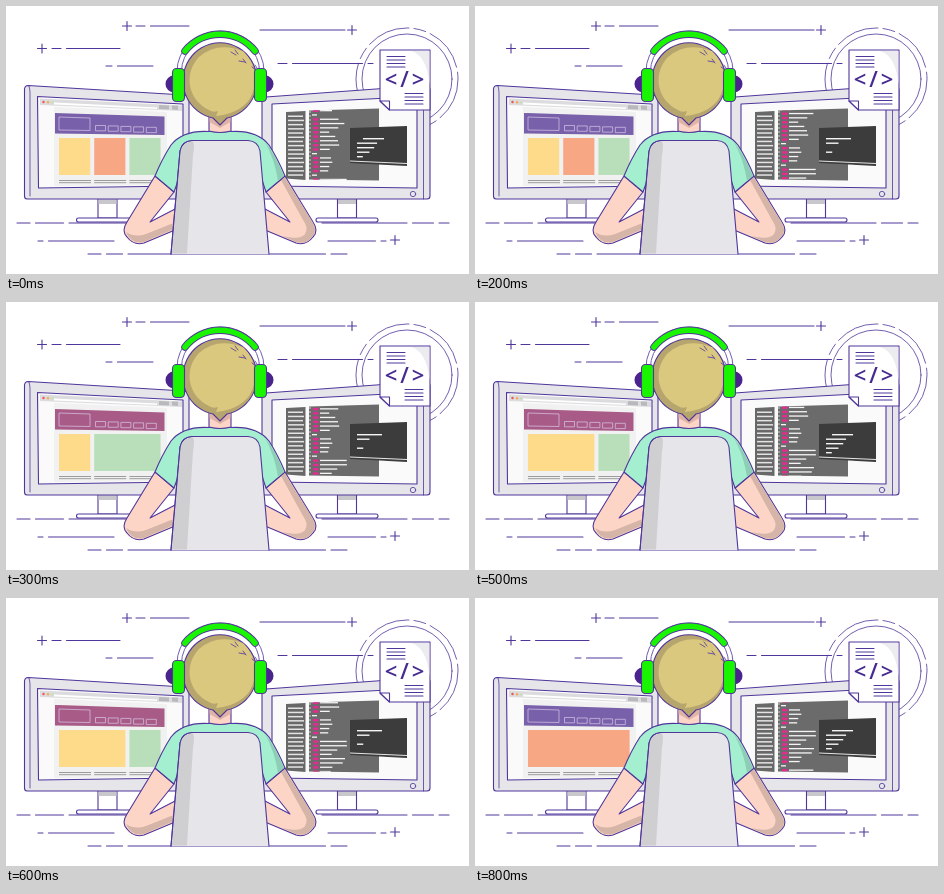
Animation, 463 px wide and 268 px high, one loop 0.9 s. Source, as an HTML page:

```html
<!DOCTYPE html>
<html lang="en">
<head>
<meta charset="utf-8">
<title>Developer at work</title>
<style>
  html, body { margin: 0; width: 100%; height: 100%; overflow: hidden; background: #fff; }
  svg { display: block; width: 100vw; height: 100vh; }
  .ink { fill: none; stroke: #50369b; stroke-width: 1.1; stroke-linecap: round; stroke-linejoin: round; }
  .bezel { fill: #e6e6ea; }
  .screen { fill: #fafafa; }
  .skin { fill: #fdd5c7; }
  .shirt { fill: #a3efd0; }
  .green { fill: #19f500; }
  .white { fill: #fff; }
  .thin { stroke-width: .8; }
</style>
</head>
<body>
<svg viewBox="0 0 463 268" preserveAspectRatio="none">
  <path id="streaks" class="ink"/>
  <g class="ink thin">
    <circle cx="401" cy="73" r="45"/>
    <circle cx="401" cy="73" r="51" stroke-dasharray="44 5 12 5"/>
  </g>

  <defs>
    <g id="stand">
      <path class="ink white" d="M-9.500 192H9.500V212H-9.500Z"/>
      <path d="M-9 193H9V198H-9Z" fill="#c8c8cc"/>
      <rect class="ink white" x="-31" y="212" width="62" height="4" rx="2"/>
    </g>
    <path id="arm" class="ink skin" d="M149 170L121 216Q115 225 121 231Q128 240 138 237L169 224L171 202L144 216L168 186Z"/>
  </defs>
  <use href="#stand" x="101.500"/>
  <use href="#stand" x="341"/>

  <!-- Left monitor -->
  <path class="ink bezel" d="M22 79.500L178 89Q183 90 183 95V193H21Q18.500 193 18.500 190V83Q19 79.500 22 79.500Z"/>
  <path class="ink thin" d="M23 80Q24 83 24 87V190"/>
  <path class="ink screen" d="M31.500 90.500L177 98V180L32.500 182Z"/>
  <path d="M34 92.500L176 99.500V105L34 99Z" fill="#dcdcdf"/>
  <path d="M48 96.500L151 101.500V103L48 98.500Z" fill="#fff"/>
  <path d="M153 99L163 99.500V103.500L153 103ZM166 99.500L172 99.800V104L166 103.500Z" fill="#b8b8bd"/>
  <circle cx="37.500" cy="96" r="1.200" fill="#ef5350"/>
  <circle cx="42" cy="96.200" r="1.200" fill="#f5a75c"/>
  <circle cx="46" cy="96.400" r="1.200" fill="#c9dfad"/>
  <path d="M48 101L161 106V179L48 180Z" fill="#f1f1f1"/>
  <path id="header" d="M49 107L158.500 110.500V129L49 127.500Z"/>
  <path id="menu" fill="none" stroke="#d9c9e8" stroke-width=".7"/>
  <g id="cards"></g>
  <path d="M53 174.500H155M53 176.700H155" stroke="#929292" stroke-width=".9" stroke-dasharray="32 3.200"/>

  <!-- Right monitor -->
  <path class="ink bezel" d="M260 91L418 79.500Q424 79 424 84V190Q424 193 421 193H256V95Q256 91.500 260 91Z"/>
  <path class="ink thin" d="M417.500 80V193"/>
  <path class="ink screen" d="M266 98L411 90.500V182L266 180Z"/>
  <circle class="ink thin" cx="407" cy="188" r="2.700"/>
  <path d="M280 106L299.500 105V174L280 172.500Z" fill="#686868"/>
  <path id="panel" d="M303 104.500L373 102.500V174.500L303 173.500Z" fill="#6b6b6b"/>
  <path d="M304 105V173" stroke="#eee" stroke-width=".8" stroke-dasharray="2 2"/>
  <g id="sidebar"></g>
  <clipPath id="codeClip"><use href="#panel"/></clipPath>
  <g id="code" clip-path="url(#codeClip)"></g>
  <path d="M344 122L401 120V160L344 157Z" fill="#3c3c3c"/>
  <path d="M344 155L401 157.500" stroke="#e6e6e6"/>
  <g id="terminal"></g>

  <!-- Document -->
  <path class="ink white" d="M374 44H424V104H383.500L374 95Z"/>
  <path d="M405 45H423.400V78Q421 50 405 45Z" fill="#ececf0"/>
  <path class="ink white" d="M374 95H383.500V104Z"/>
  <path class="ink" d="M381 50.500h18m-18 3.500h18m-18 3.500h18m-18 3.500h18M399 87.500h18m-18 3.500h18m-18 3.500h18m-18 3.500h18"/>
  <text x="400" y="81" text-anchor="middle" font-family="Open Sans, sans-serif" font-size="22" font-weight="600" letter-spacing="3" fill="#452a91">&lt;/&gt;</text>

  <!-- Person -->
  <use href="#arm"/>
  <path d="M120 226Q126 239 138 236L168 223L170 216L140 228Q129 232 120 226Z" fill="#d6b5a9"/>
  <use href="#arm" transform="matrix(-1 0 0 1 428 0)"/>
  <path d="M278.500 171L306.500 216Q312 225 306 231Q300 239 290 236L276 230Q297 235 300 226Q302 221 297 214L275 174Z" fill="#d6b5a9"/>
  <path class="ink shirt" d="M203 125.500Q177 124 165 139Q156 153 149 170L168 186L180 153H249L260 186L279 170Q272 153 263 139Q251 124 225 125.500Z"/>
  <path d="M259 136Q270 150 278 170L272 175Q269 154 259 136Z" fill="#8fcdb6"/>
  <path class="ink skin" d="M203 108V125Q214 128 225 125V108Z"/>
  <path d="M203.600 108H224.400V116L214 122L203.600 116Z" fill="#dfb4a7"/>
  <path class="ink bezel" d="M165 248L174 145Q176 135 186 134.500H242Q252 135 254 145L263 248"/>
  <path d="M165.700 247.500L174.600 145Q176 136 187 135.200Q189 139 187 149L181 247.500Z" fill="#cfcfd1"/>
  <path class="ink" d="M165 248L174 145Q176 135 186 134.500"/>

  <circle cx="168" cy="78" r="8.500" fill="#4b238d"/>
  <circle cx="259" cy="78" r="8.500" fill="#4b238d"/>
  <path class="ink" style="fill:#b7a56e" d="M207 112A37 38 0 1 1 221 112L214 119Z"/>
  <path d="M237 45Q211 35 193 51C177 68 182 94 203 104Q207 107 212 105L210 110Q232 108 243 94C254 76 250 58 237 45Z" fill="#dac87f"/>
  <path class="ink thin" d="M225 46L230 49M229 44L232 48M233 55L239 56M237 53L240 57M246 61L250 64M249 59L251 62"/>
  <path class="ink thin white" d="M171 65A43.500 40 0 0 1 258 65H253.500A39 35.500 0 0 0 175.500 65Z"/>
  <path class="ink" style="stroke-width:7.500" d="M179 45A45 45 0 0 1 249 45"/>
  <path d="M179 45A45 45 0 0 1 249 45" fill="none" stroke="#19f500" stroke-width="5.600" stroke-linecap="round"/>
  <rect class="ink green" x="166.500" y="62.500" width="12" height="33" rx="4"/>
  <rect class="ink green" x="248.500" y="62.500" width="12" height="33" rx="4"/>
</svg>
<script>
const $ = id => document.getElementById(id);
const rect = (x, y, w, h, fill) => `<rect x="${x}" y="${y}" width="${w}" height="${h}" fill="${fill}"/>`;
const repeat = (count, make) => Array.from({ length: count }, (_, i) => make(i)).join("");
const random = seed => Math.abs(Math.sin(seed * 127.1 + 3) * 43758.5) % 1;

// A line from one end to the other that opens with short ticks.
function streak(y, from, to, ...ticks) {
  const dir = Math.sign(to - from);
  let path = "", x = from;
  for (const tick of ticks) {
    path += `M${x} ${y}h${dir * tick}`;
    x += dir * (tick + 5.5);
  }
  return path + `M${x} ${y}H${to}`;
}
const plus = (x, y) => `M${x - 4.5} ${y}h9M${x} ${y - 4.5}v9`;

$("streaks").setAttribute("d", [
  plus(36, 42.5), streak(42.5, 46, 114, 9),
  plus(121, 20), streak(20, 130, 183, 9),
  plus(346, 24), streak(24, 254, 339),
  streak(60, 100, 147, 6),
  streak(57.5, 272, 320, 9), streak(57.5, 367, 320, 5),
  streak(217, 11, 126, 13, 28), streak(217, 443, 316, 10, 21),
  streak(235, 32, 108, 5), streak(235, 380, 322, 5), plus(389, 234),
  streak(248, 82, 240, 13, 16), streak(248, 341, 240, 16)
].join(""));

$("menu").setAttribute("d", "M53 111L84 112V124.500L53 124Z" +
  repeat(5, i => `M${89.5 + i * 12.7} ${119.5 + i * .45}h10v5.300h-10z`));
$("sidebar").innerHTML = repeat(15, i => rect(282, 109.5 + i * 4.2, 15 + i % 2, 1.5, "#e4e4e4"));

const purple = "#7960aa", magenta = "#a95b87";
const yellow = "#fedb8b", orange = "#f8a785", mint = "#b9dfba";
// Each card is a column span and a colour.
const layouts = [
  { header: purple, cards: [[1, yellow], [1, orange], [1, mint]] },
  { header: magenta, cards: [[1, yellow], [2, mint]] },
  { header: magenta, cards: [[2, yellow], [1, mint]] },
  { header: purple, cards: [[3, orange]] }
];

function drawPage({ header, cards }) {
  const pitch = 35.2;
  let column = 0;
  $("header").setAttribute("fill", header);
  $("cards").innerHTML = cards.map(([span, color]) => {
    const x = 53 + pitch * column;
    column += span;
    return rect(x, 132, pitch * span - 4, 37, color);
  }).join("");
}

function codeLine(row, y) {
  if (row % 14 === 1 || row % 14 === 10) return rect(306, y, 5, 1.3, "#f5f5f5");
  const width = 8 + 20 * random(row);
  return rect(307, y - .4, 5.5, 2.4, "#e52b91") + rect(314, y, width, 1.3, "#f5f5f5");
}

function terminalLine(i, full) {
  if (!full && i > 1 && i !== 3) return "";
  const indent = full && i === 0 ? 6 : 0;
  const width = full ? 21 - i * i * .95 : 25 / (i + 1);
  return rect(351 + indent, 132 + i * 4.5, width, 1.4, "#f5f5f5");
}

function draw(step) {
  drawPage(layouts[Math.floor(Math.max(0, step - 1) / 2)]);
  $("code").innerHTML = repeat(27, row => codeLine(row, 104 + row * 4.3 - step * 5));
  $("terminal").innerHTML = repeat(5, i => terminalLine(i, step % 4 < 2));
}

let shown = -1;
function tick() {
  const step = Math.floor(performance.now() % 900 / 100);
  if (step !== shown) draw(shown = step);
  requestAnimationFrame(tick);
}
tick();
</script>
</body>
</html>
```
